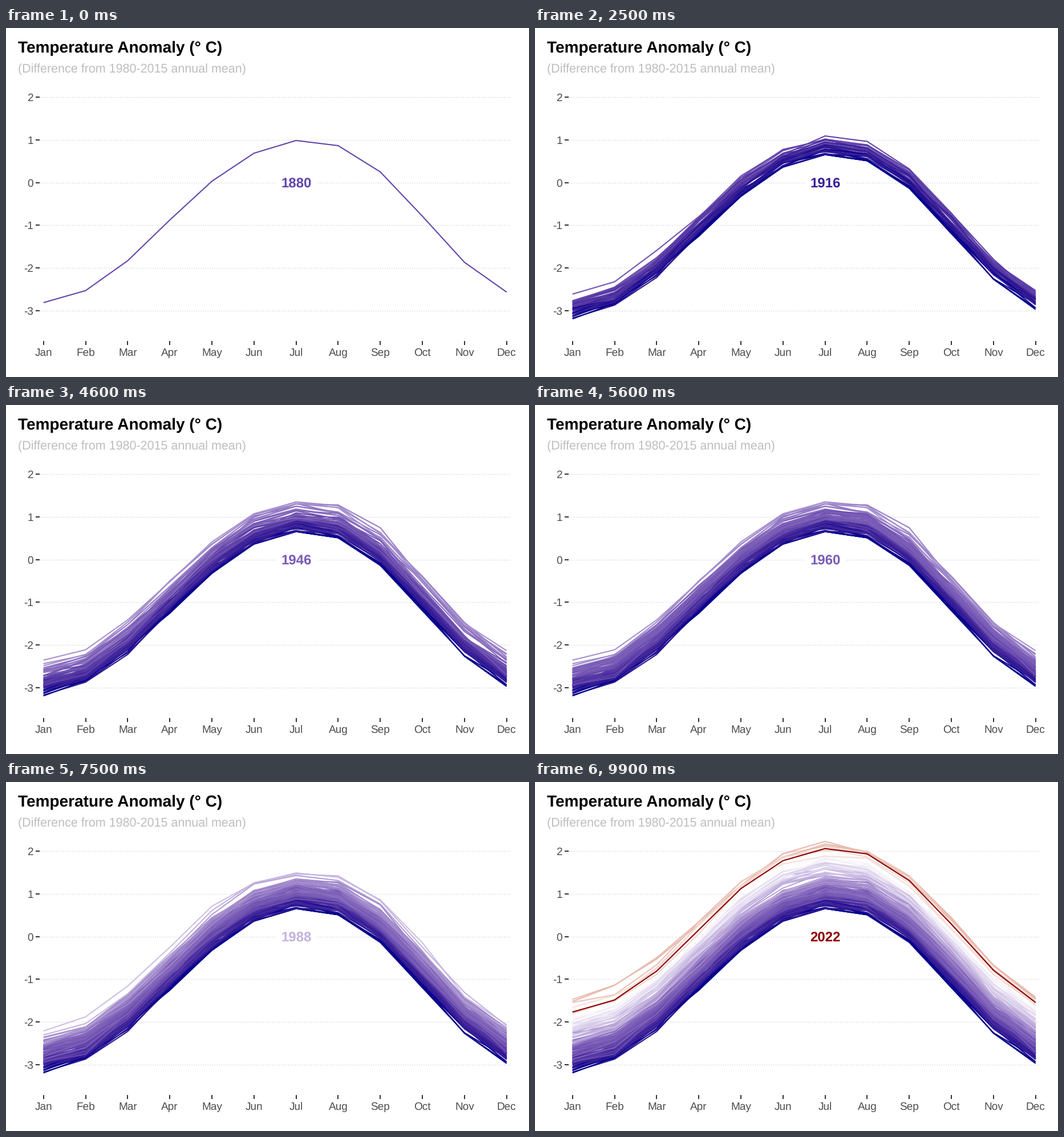
Animation, 917 px wide and 611 px high, one loop 10 s. Source, as a matplotlib script:

```python
import numpy as np
import matplotlib.pyplot as plt
from matplotlib.animation import FuncAnimation
from matplotlib.collections import LineCollection

W, H, DPI = 917, 611, 64
FIRST, LAST, FRAMES = 1880, 2022, 100
MONTHS = "Jan Feb Mar Apr May Jun Jul Aug Sep Oct Nov Dec".split()
plt.rcParams["font.family"] = "Liberation Sans"
plt.rcParams["text.hinting"] = "none"

# Turning points of the yearly mean anomaly, in degrees
TREND = {1880: -0.17, 1887: -0.36, 1899: -0.18, 1909: -0.49, 1916: -0.37,
         1930: -0.18, 1944: 0.20, 1946: -0.07, 1956: -0.17, 1961: 0.06,
         1976: -0.10, 1990: 0.45, 1992: 0.22, 1998: 0.61, 2000: 0.39,
         2014: 0.72, 2016: 1.01, 2022: 0.89}
COLDEST = min(TREND.values())
OFFSET = 0.70

rng = np.random.default_rng(11)
years = np.arange(FIRST, LAST + 1)
theta = 2 * np.pi * np.arange(12) / 12


def scatter(*shape):
    return np.clip(rng.normal(size=shape), -1.9, 1.9)


def yearly_means():
    points = list(TREND)
    mean = np.interp(years, points, list(TREND.values()))
    wobble = 0.07 * scatter(len(years))
    wobble[np.isin(years, points)] = 0
    return np.maximum(mean + wobble, COLDEST)


def seasonal_cycle():
    return (-OFFSET - 1.929 * np.cos(theta) - 0.048 * np.sin(theta)
            - 0.038 * np.cos(2 * theta) + 0.058 * np.sin(2 * theta)
            + 0.033 * np.cos(3 * theta))


def monthly_values(mean):
    n = len(mean)
    raw = scatter(n * 12 + 1)
    noise = 0.07 * (0.8 * raw[1:] + 0.6 * raw[:-1]).reshape(n, 12)
    # Winters vary more than summers
    winter = 0.5 + 0.5 * np.cos(theta - 0.5)
    noise += 0.12 * scatter(n, 1) * winter
    noise -= noise.mean(axis=1, keepdims=True)
    noise[[0, -1]] *= 0.2
    floor = -0.59 - 0.09 * np.cos(theta)
    return np.maximum(mean[:, None] + noise, floor) + seasonal_cycle()


# Colour blending in CIE Lab
RGB_XYZ = np.array([[0.4124, 0.3576, 0.1805],
                    [0.2126, 0.7152, 0.0722],
                    [0.0193, 0.1192, 0.9505]])
XYZ_LAB = np.array([[0, 116, 0], [500, -500, 0], [0, 200, -200]])
WHITE = RGB_XYZ.sum(axis=1)


def to_lab(rgb):
    c = np.array(rgb, float)
    c = np.where(c > 0.04045, ((c + 0.055) / 1.055) ** 2.4, c / 12.92)
    t = RGB_XYZ @ c / WHITE
    f = np.where(t > 0.008856, np.cbrt(t), 7.787 * t + 16 / 116)
    return XYZ_LAB @ f - [16, 0, 0]


def to_rgb(lab):
    f = np.linalg.solve(XYZ_LAB, lab + [16, 0, 0])
    t = np.where(f > 0.2069, f ** 3, (f - 16 / 116) / 7.787)
    c = np.clip(np.linalg.solve(RGB_XYZ, t * WHITE), 0, 1)
    c = np.where(c > 0.0031308, 1.055 * c ** (1 / 2.4) - 0.055, 12.92 * c)
    return tuple(np.clip(c, 0, 1))


DARK_BLUE, DARK_RED = (0, 0, 139 / 255), (139 / 255, 0, 0)
LOW, MID, HIGH = (to_lab(c) for c in (DARK_BLUE, (1, 1, 1), DARK_RED))


def year_color(mean):
    t = (mean - OFFSET) / (OFFSET - COLDEST)
    return to_rgb(MID + abs(t) * ((HIGH if t > 0 else LOW) - MID))


def px(n):
    return n * 72 / DPI


def month_x(i):
    return 65.7 + 73.82 * i


def temp_y(v):
    return 270.72 - 74.7 * v


fig = plt.figure(figsize=(W / DPI, H / DPI), dpi=DPI, facecolor="white")
ax = fig.add_axes([0, 0, 1, 1])
ax.set(xlim=(0, W), ylim=(H, 0))
ax.axis("off")


def text(x, y, s, size, color, **kw):
    return ax.text(x, y, s, fontsize=px(size), color=color, va="baseline", **kw)


text(21.3, 43.3, "Temperature Anomaly (° C)", 28, "black", weight="bold")
text(20.7, 78.6, "(Difference from 1980-2015 annual mean)", 21.5, "#bebebe")

TICK = dict(color="#333333", lw=px(2), solid_capstyle="butt")
for v in range(-3, 3):
    y = temp_y(v)
    ax.plot([59, 884.5], [y, y], color="#cccccc", lw=px(1.3),
            ls=(0, (1, 2.1)), dash_capstyle="butt", zorder=1)
    ax.plot([52, 59], [y, y], **TICK)
    text(47.8, y + 7, str(v), 19, "#4d4d4d", ha="right")
for i, name in enumerate(MONTHS):
    x = month_x(i)
    ax.plot([x, x], [548, 554.5], **TICK)
    text(x, 574, name, 19, "#4d4d4d", ha="center")

ax.add_patch(plt.Rectangle((472, 253), 73, 36, fc="white", ec="none", zorder=2))
label = text(508.7, 280, "", 24, "black", weight="bold", ha="center", zorder=5)

means = yearly_means()
curves = [np.column_stack([month_x(np.arange(12)), temp_y(row)])
          for row in monthly_values(means)]
colors = [year_color(m) for m in means[:-1]] + [DARK_RED]
lines = LineCollection([], linewidths=px(2.1), capstyle="butt", zorder=3)
ax.add_collection(lines, autolim=False)


def draw(frame):
    i = round((LAST - FIRST) * frame / (FRAMES - 1))
    lines.set_segments(curves[:i + 1])
    lines.set_color(colors[:i + 1])
    label.set_text(str(FIRST + i))
    label.set_color(colors[i])
    return lines, label


anim = FuncAnimation(fig, draw, frames=FRAMES, interval=100,
                     repeat=True, repeat_delay=0)
plt.show()
```
